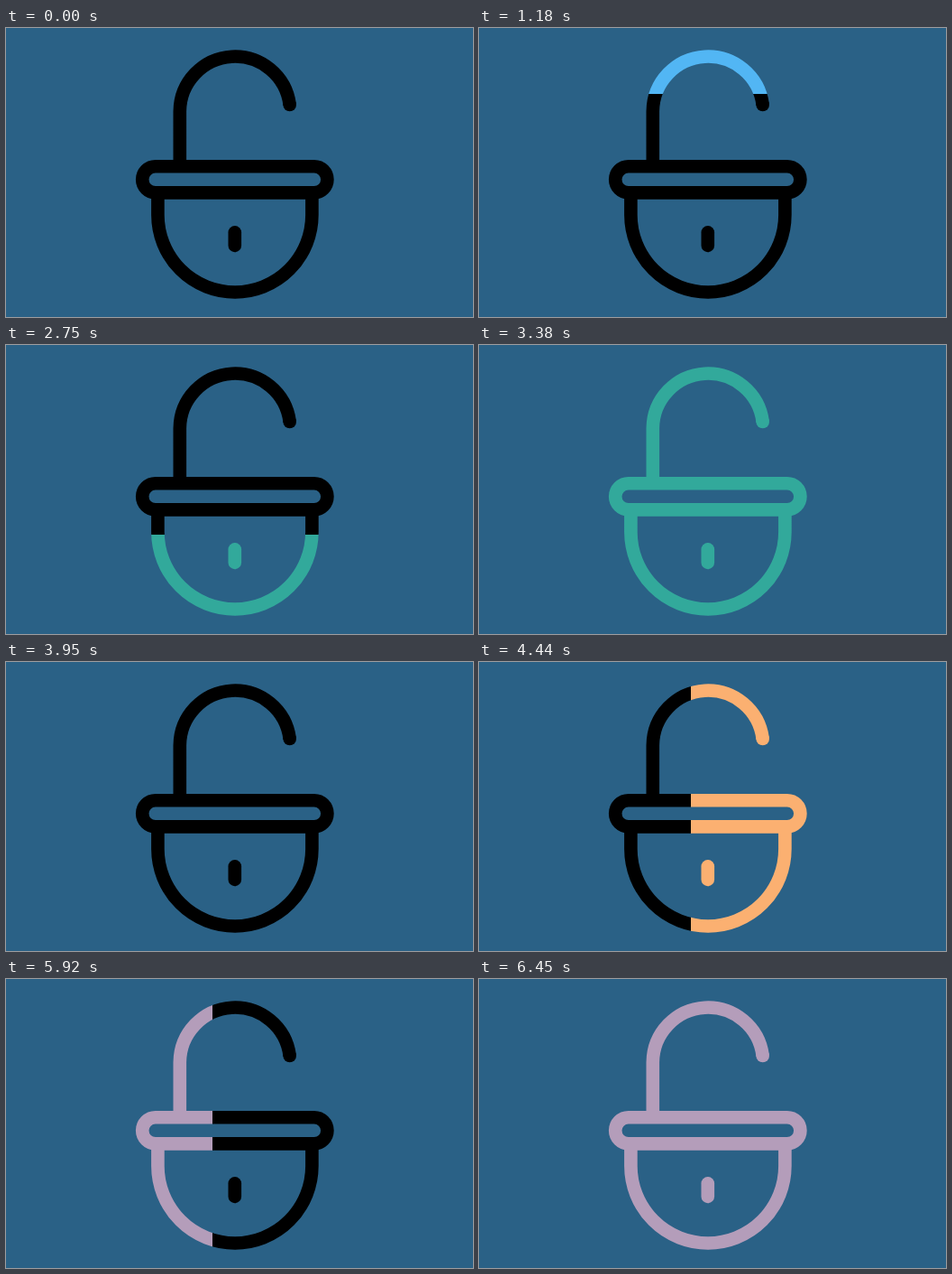
Animation of 518 by 320 pixels, one loop 6.5 s. Source, as an HTML page:

```html
<!DOCTYPE html>
<html lang="en">
<head>
<meta charset="utf-8">
<title>Padlock colour wipes</title>
<style>
  html, body { margin: 0; width: 100%; height: 100%; overflow: hidden; background: #2a6186; }
  svg { display: block; width: 518px; height: 320px; }
</style>
</head>
<body>
<svg viewBox="0 0 518 320">
  <defs>
    <linearGradient id="ink" gradientUnits="userSpaceOnUse">
      <stop class="fill"/>
      <stop class="rest" stop-color="#000"/>
    </linearGradient>
  </defs>
  <g fill="none" stroke="url(#ink)" stroke-width="14.6">
    <path d="M192.8 153V92.2A61.2 61.2 0 0 1 314.7 85" />
    <circle cx="314.7" cy="85" r="7.3" fill="url(#ink)" stroke="none"/>
    <rect x="151.2" y="153.2" width="205.2" height="29.2" rx="14.6"/>
    <path d="M168.4 183V207A85.5 85.5 0 0 0 339.4 207V183"/>
    <path d="M253.8 226.3V240.9" stroke-linecap="round"/>
  </g>
</svg>
<script>
const LOOP = 6500, TICK = 70, SWEEP = 734;

// Each wipe crosses a 320px square; line is [x1, y1, x2, y2].
const wipes = [
  { color: '#52b6f4', line: [0, 2, 0, 322],   start: 966,  first: 1020, anchor: 1620, end: 2330 },
  { color: '#32a99b', line: [0, 322, 0, 2],   start: 2493, first: 2540, anchor: 2540, end: 3880 },
  { color: '#fbb071', line: [414, 0, 94, 0],  start: 4029, first: 4160, anchor: 4160, end: 5430 },
  { color: '#b49dba', line: [94, 0, 414, 0],  start: 5560, first: 5710, anchor: 6220, end: LOOP }
];

const ink = document.getElementById('ink');
const fill = ink.querySelector('.fill');
const rest = ink.querySelector('.rest');

function progress(w, t) {
  if (t < w.first) return 0;
  const stepped = w.anchor + Math.floor((t - w.anchor) / TICK) * TICK;
  return Math.min(1, (Math.max(stepped, w.first) - w.start) / SWEEP);
}

function draw(t) {
  const w = wipes.find(w => t < w.end);
  const p = progress(w, t);
  ['x1', 'y1', 'x2', 'y2'].forEach((name, i) => ink.setAttribute(name, w.line[i]));
  fill.setAttribute('stop-color', p ? w.color : '#000');
  fill.setAttribute('offset', p);
  rest.setAttribute('offset', p);
  rest.setAttribute('stop-color', p < 1 ? '#000' : w.color);
}

const origin = performance.now();
function frame() {
  draw((performance.now() - origin) % LOOP);
  requestAnimationFrame(frame);
}
frame();
</script>
</body>
</html>
```
